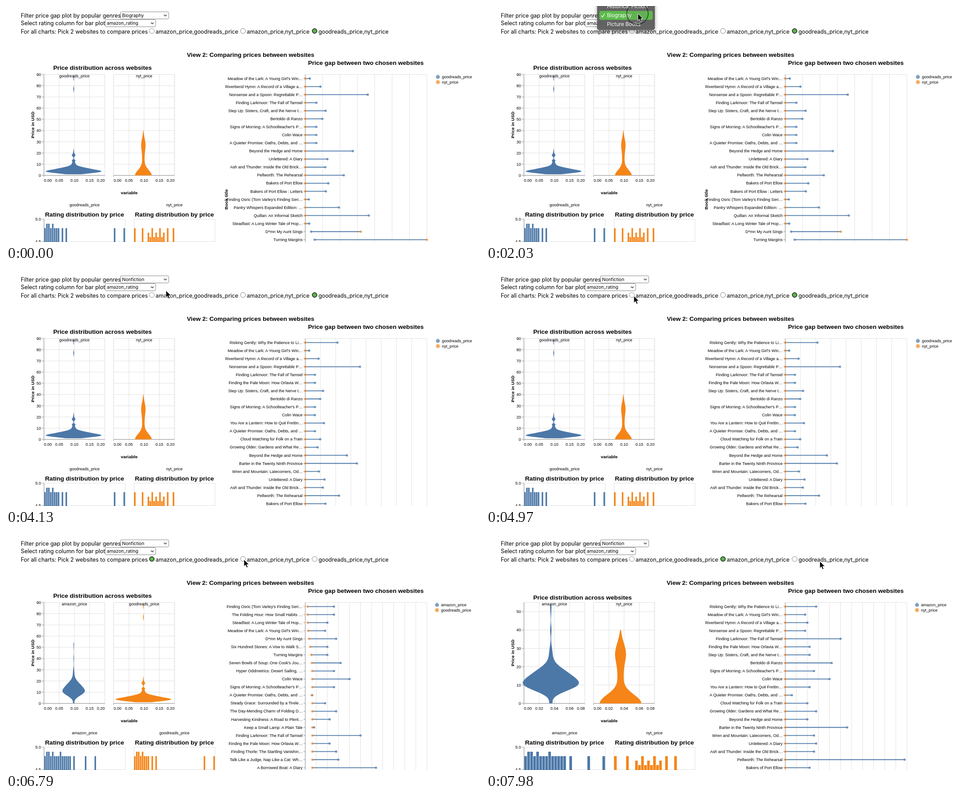
These frames come from a looping animation (1058 px wide and 529 px high, 8000 ms). An HTML page:

```html
<!DOCTYPE html>
<html lang="en">
<head>
<meta charset="utf-8">
<title>Price comparison dashboard</title>
<style>
  html, body { margin: 0; width: 100%; height: 100%; overflow: hidden; background: #fff; }
  svg { display: block; width: 1058px; height: 529px; }
  text { font: 9.06px "Liberation Sans", Arial, sans-serif; white-space: pre; }
  .title { font-size: 13.55px; font-weight: bold; }
  .axis { font-size: 9.97px; font-weight: bold; }
  .ui { font: 12.4px Inter, sans-serif; }
  .select { font: 10.1px Inter, sans-serif; }
  .menu { font: 11.5px Inter, sans-serif; fill: #fff; }
  #menu { filter: drop-shadow(0 3px 5px rgba(0, 0, 0, .35)); }
</style>
</head>
<body>
<svg id="stage" viewBox="0 0 1058 529"></svg>
<script>
const BLUE = '#4c78a8', ORANGE = '#f58518', GRID = '#ddd', AXIS = '#888';
const COLORS = [BLUE, ORANGE];
const LOOP = 8000, STEP = 70;

const titles = [
  "Meadow of the Lark: A Young Girl's Win…", "Riverbend Hymn: A Record of a Village a…",
  "Nonsense and a Spoon: Regrettable P…", "Finding Larkmoor: The Fall of Tamsel",
  "Step Up: Sisters, Craft, and the Nerve t…", "Bertoldo di Ranzo",
  "Signs of Morning: A Schoolteacher's P…", "Colin Wace",
  "A Quieter Promise: Oaths, Debts, and …", "Beyond the Hedge and Home",
  "Unlettered: A Diary", "Ash and Thunder: Inside the Old Brick…",
  "Pellworth: The Rehearsal", "Bakers of Port Ellow", "Bakers of Port Ellow : Letters",
  "Finding Osric (Tom Varley's Finding Seri…", "Pantry Whispers Expanded Edition: …",
  "Quillan: An Informal Sketch", "Steadfast: A Long Winter Tale of Hop…",
  "D*mn My Aunt Sings", "Turning Margins", "Risking Gently: Why the Patience to Li…",
  "Finding the Pale Moon: How Orlavia W…", "You Are a Lantern: How to Quit Frettin…",
  "Cloud Watching for Folk on a Train", "Growing Older: Gardens and What Re…",
  "Barter in the Twenty Ninth Province", "Wren and Mountain: Latecomers, Od…",
  "The Folding Hour: How Small Habits …", "Six Hundred Stones: A Vow to Walk S…",
  "Seven Bowls of Soup: One Cook's Jou…", "Hyper Oddmetrics: Desert Sailing, …",
  "Steady Grace: Surrounded by a Tirele…", "The Day-Mending Charm of Folding D…",
  "Harvesting Kindness: A Road to Plent…", "Keep a Small Lamp: A Plain Tale",
  "Finding Thorle: The Startling Vanishin…", "Talk Like a Judge, Nap Like a Cat: Wh…",
  "A Borrowed Boat: A Diary"
];
const biography = titles.slice(0, 21).map((_, i) => i);
const nonfiction = [21, 0, 1, 2, 3, 22, 4, 5, 6, 7, 23, 8, 24, 25, 9, 26, 27, 10, 11, 12, 13];
const cheapest = [15, 28, 18, 0, 19, 29, 20, 30, 31, 7, 6, 8, 32, 33, 34, 35, 3, 22, 36, 37, 38];

function seeded(seed) {
  return () => (seed = seed * 16807 % 2147483647) / 2147483647;
}

// Typical prices in USD come from a rule; only the outstanding ones are named.
const outstanding = {
  goodreads: { 2: 18, 9: 13.7, 12: 11.1, 16: 9.7, 17: 18.3, 21: 10.6, 26: 17 },
  amazon: { 3: 25, 5: 21, 7: 20, 8: 3, 12: 54, 26: 28, 35: 4, 38: 32 },
  nyt: { 19: 16, 20: 35 }
};
const random = seeded(77);
const books = titles.map((title, i) => {
  const rank = cheapest.indexOf(i);
  const typical = {
    goodreads: rank < 0 ? 4 + 3 * random() : 1 + 2.2 / (1 + Math.exp(4.8 - rank)),
    amazon: Math.round(9 + 7 * random()),
    nyt: 0
  };
  const price = site => outstanding[site][i] ?? typical[site];
  return { title, goodreads: price('goodreads'), amazon: price('amazon'), nyt: price('nyt') };
});

// Price density as a sum of bells: [height in px, mean, deviation].
const bells = {
  goodreads: [[45, 3.2, 1.5], [30, 5.5, 2], [3, 11, 1.5], [3.2, 13.4, .6], [3, 18, .8], [1.4, 19, 2.5], [.9, 77, 1.6], [.8, 87, 1.6]],
  nyt: [[18.5, 0, 5], [2, 14, 5], [4.8, 27, 6]],
  amazon: [[20, 10, 3.5], [12.8, 16, 4], [1.4, 27, 4], [.6, 40, 2.5], [.6, 53, 4], [1, 0, 1.5]]
};
const priceRange = { goodreads: [1, 90], nyt: [0, 40], amazon: [0, 54] };
const density = (site, p) => bells[site].reduce((sum, [h, m, d]) => sum + h * Math.exp(-(((p - m) / d) ** 2) / 2), 0);

// Rated price bins: one solid run and a few lone bins.
const ratedBins = {
  goodreads: { run: [0, 7], lone: [9, 11, 36, 41] },
  amazon: { run: [0, 13], lone: [15, 21, 26] },
  nyt: { run: [7, 15], lone: [0, 4, 17, 20] }
};
function ratingTenths(site, i) {
  if (site == 'nyt') return ratedBins.nyt.lone.includes(i) ? 8 : 6 + (i % 4 == 1 ? 2 : i % 2);
  return i && !(i & (i - 1)) ? 9 : 8;
}

const narrow = { xStep: .05, yMax: 90, titleY: 142.8, bins: 42, center: 66.3, spread: 1 };
const wide = { xStep: .02, yMax: 55, titleY: 146.8, bins: 27, center: 60, spread: 2.5 };
const scenes = [
  { ...narrow, sites: ['goodreads', 'nyt'], rows: biography, cells: 7, legendX: 964, bookAxis: true },
  { ...narrow, sites: ['goodreads', 'nyt'], rows: nonfiction, cells: 8, legendX: 964 },
  { ...narrow, sites: ['amazon', 'goodreads'], rows: cheapest, cells: 11, legendX: 962 },
  { ...wide, sites: ['amazon', 'nyt'], rows: nonfiction, cells: 11, legendX: 962 }
];

const text = (x, y, str, anchor = 'start', cls = '') =>
  `<text x="${x}" y="${y}" text-anchor="${anchor}" class="${cls}">${str}</text>`;
const line = (x1, y1, x2, y2, color = GRID, width = .906) =>
  `<line x1="${x1}" y1="${y1}" x2="${x2}" y2="${y2}" stroke="${color}" stroke-width="${width}"/>`;
const dot = (x, y, color, r = 2.6) => `<circle cx="${x}" cy="${y}" r="${r}" fill="${color}" opacity=".7"/>`;
const frame = (x, y, w, h) => `<rect x="${x}" y="${y}" width="${w}" height="${h}" fill="none" stroke="${GRID}" stroke-width=".906"/>`;
const vertical = (x, y, str) => `<g transform="translate(${x} ${y}) rotate(-90)">${text(0, 0, str, 'middle', 'axis')}</g>`;

function violin(s, site, center, priceY) {
  const [low, high] = priceRange[site], left = [], right = [];
  for (let p = low; p <= Math.min(high, s.yMax); p += .5) {
    const w = density(site, p) * s.spread, half = w < .15 ? 0 : w;
    left.push([center - half, priceY(p)]);
    right.unshift([center + half, priceY(p)]);
  }
  return left.concat(right).join(' ');
}

function violinPanel(s, k) {
  const left = [84.7, 240.3][k], top = 153.5, bottom = 379.7, width = 135.9;
  const priceY = p => bottom - p / s.yMax * (bottom - top);
  let out = frame(left, top, width, bottom - top);
  for (let p = 0; p <= s.yMax; p += 10) {
    const y = priceY(p);
    out += line(left, y, left + width, y);
    if (!k) out += line(80, y, left, y, AXIS) + text(78, y + 3.2, p, 'end');
  }
  for (let i = 0; i <= 4; i++) {
    const x = left + i * width / 4;
    out += line(x, top, x, bottom) + line(x, bottom, x, bottom + 4, i ? GRID : AXIS);
    out += text(x, 394, (i * s.xStep).toFixed(2), i == 0 ? 'start' : i == 4 ? 'end' : 'middle');
  }
  if (!k) out += line(left, top, left, bottom, AXIS);
  out += line(left, bottom, left + width, bottom, AXIS);
  out += `<polygon points="${violin(s, s.sites[k], left + s.center, priceY)}" fill="${COLORS[k]}"/>`;
  return out + text(left + 68, 160, s.sites[k] + '_price', 'middle');
}

function ratingPanel(s, k) {
  const left = [84.9, 285.4][k], mid = left + 90.5, site = s.sites[k];
  const { run, lone } = ratedBins[site], pitch = 181.2 / s.bins;
  let out = frame(left, 478, 181.2, 80) + line(left, 528, left + 181, 528);
  for (let i = 0; i < s.bins; i++) {
    if (!lone.includes(i) && (i < run[0] || i > run[1])) continue;
    const y = 578 - ratingTenths(site, i) * 10;
    out += `<rect x="${left + .5 + i * pitch}" y="${y}" width="${pitch - .9}" height="80" fill="${COLORS[k]}"/>`;
  }
  if (!k) {
    out += line(left, 478, left, 529, AXIS);
    ['5.0', '4.5'].forEach((n, i) => {
      const y = 478 + i * 50;
      out += line(80, y, left, y, AXIS) + text(78, y + 3.2, n, 'end');
    });
  }
  return out + text(mid, 449, site + '_price', 'middle') +
    text(mid, 471.5, 'Rating distribution by price', 'middle', 'title');
}

function gapChart(s) {
  const left = 668, width = 271.4;
  const priceX = p => left + p / (s.cells * 5) * width;
  let out = '';
  for (let i = 0; i <= s.cells; i++) out += line(priceX(i * 5), 153.5, priceX(i * 5), 529);
  out += line(left, 153.5, left + width, 153.5) + line(left, 153.5, left, 529, AXIS);
  s.rows.forEach((id, i) => {
    const y = 162.6 + i * 18.06, [b, a] = s.sites.map(site => priceX(books[id][site]));
    out += text(662, y + 3.1, books[id].title, 'end') + line(664, y, left, y, AXIS);
    out += line(a, y, b, y, BLUE, 1.8) + dot(b, y, BLUE) + dot(a, y, ORANGE);
  });
  s.sites.forEach((site, i) => {
    const y = 159 + i * 11.6;
    out += dot(s.legendX, y, COLORS[i], 4.4) + text(s.legendX + 9, y + 3.2, site + '_price');
  });
  return out;
}

const drawScene = (s, i) => `<g id="scene${i}">` +
  text(s.legendX / 4 + 305, 114, 'View 2: Comparing prices between websites', 'middle', 'title') +
  text(215.3, s.titleY, 'Price distribution across websites', 'middle', 'title') +
  text(803.3, 132.3, 'Price gap between two chosen websites', 'middle', 'title') +
  violinPanel(s, 0) + violinPanel(s, 1) + text(275, 422, 'variable', 'middle', 'axis') +
  vertical(63, 266.5, 'Price in USD') + (s.bookAxis ? vertical(495, 433.5, 'Book title') : '') +
  ratingPanel(s, 0) + ratingPanel(s, 1) + gapChart(s) + '</g>';

const select = (x, y, w, label, id) =>
  `<rect x="${x + .5}" y="${y + .5}" width="${w}" height="16" rx="2" fill="#fff" stroke="#767676" stroke-width=".9"/>` +
  `<text id="${id}" class="select" x="${x + 4.3}" y="${y + 12}">${label}</text>` +
  `<path d="M${x + w - 10} ${y + 7}l3 3.2 3-3.2" fill="none" stroke="#222" stroke-width="1.2"/>`;

const radios = [[325.5, 'amazon_price,goodreads_price'], [529, 'amazon_price,nyt_price'], [688.8, 'goodreads_price,nyt_price']];
const controls =
  text(33, 25.5, 'Filter price gap plot by popular genres', 'start', 'ui') +
  text(33, 42.5, 'Select rating column for bar plot', 'start', 'ui') +
  text(33, 61.5, 'For all charts: Pick 2 websites to compare prices', 'start', 'ui') +
  select(255, 12.5, 107.5, 'Biography', 'genre') + select(221, 30, 112.5, 'amazon_rating', 'rating') +
  radios.map(([x, label]) =>
    `<circle cx="${x}" cy="56" r="5.6" fill="#fff" stroke="#767676" stroke-width=".9"/>` +
    text(x + 8.6, 61.5, label, 'start', 'ui')).join('') +
  '<circle id="picked" cy="56" r="4.9" fill="#5fb54a" stroke="#23402a" stroke-width="1.7"/>';

const overlay =
  '<g id="menu"><rect x="248" y="-12" width="129" height="66" rx="5" fill="#606060" opacity=".96"/>' +
  '<rect id="highlight" x="253" y="11" width="119" height="20" rx="4" fill="#5cba4b"/>' +
  ['Historical Fiction', 'Biography', 'Picture Books'].map((genre, i) =>
    text(270, 5.4 + i * 20, genre, 'start', 'menu')).join('') +
  '<path d="M257.5 21.5l2.6 3.3 4.6-7.6" fill="none" stroke="#fff" stroke-width="1.4"/></g>' +
  '<g id="pointer"><circle id="ring" cx="-1" r="24" fill="rgba(128,128,128,.15)" stroke="#222" stroke-width="1.3"/>' +
  '<path d="M0 0V15.8L3.6 12.4 6.2 18.4 8.9 17.2 6.4 11.4H11.4Z" fill="#000" stroke="#fff" stroke-width="1"/></g>';

const stage = document.getElementById('stage');
stage.innerHTML = controls + scenes.map(drawScene).join('') + overlay;
const el = id => document.getElementById(id);
const show = (id, on) => { el(id).style.display = on ? '' : 'none'; };

// Each move eases from the previous place to (x, y), sagging by `sag` midway.
const moves = [
  { from: 0, to: 770, x: 321, y: 27 },
  { from: 1470, to: 1890, x: 339, y: 17 },
  { from: 3990, to: 4130, x: 357, y: 46 },
  { from: 4130, to: 4480, x: 338, y: 63 },
  { from: 4550, to: 5110, x: 328.5, y: 57 },
  { from: 5880, to: 6650, x: 531, y: 57, sag: 34 },
  { from: 7350, to: 7770, x: 788, y: 96, sag: 40 },
  { from: 7770, to: 7980, x: 745, y: 61 }
];
const clicks = [[980, 1120], [1890, 2100], [5110, 5250], [6650, 6790]];
const within = (t, [a, b]) => t >= a && t < b;

function pointerAt(t) {
  let x = 600, y = 400;
  for (const m of moves) {
    if (t < m.from) break;
    const p = Math.min(1, (t - m.from) / (m.to - m.from)), u = p * p * (3 - 2 * p);
    x += (m.x - x) * u;
    y += (m.y - y) * u + (m.sag || 0) * Math.sin(Math.PI * u);
  }
  return [x, y];
}

function render(time) {
  const t = Math.floor(time % LOOP / STEP) * STEP;
  const scene = t < 4060 ? 0 : t < 5390 ? 1 : t < 7070 ? 2 : 3;
  scenes.forEach((_, i) => show('scene' + i, i == scene));
  el('genre').textContent = scene ? 'Nonfiction' : 'Biography';
  el('picked').setAttribute('cx', radios[[2, 2, 0, 1][scene]][0]);
  show('menu', within(t, [2030, 3640]));
  el('menu').style.opacity = t < 3430 ? 1 : .96 - (t - 3430) / STEP * .32;
  show('highlight', t < 2380);
  show('pointer', within(t, [70, 2450]) || t >= 4060);
  show('ring', clicks.some(c => within(t, c)));
  el('pointer').setAttribute('transform', `translate(${pointerAt(t)})`);
}

const begin = performance.now();
function tick() {
  render(performance.now() - begin);
  requestAnimationFrame(tick);
}
tick();
</script>
</body>
</html>
```
